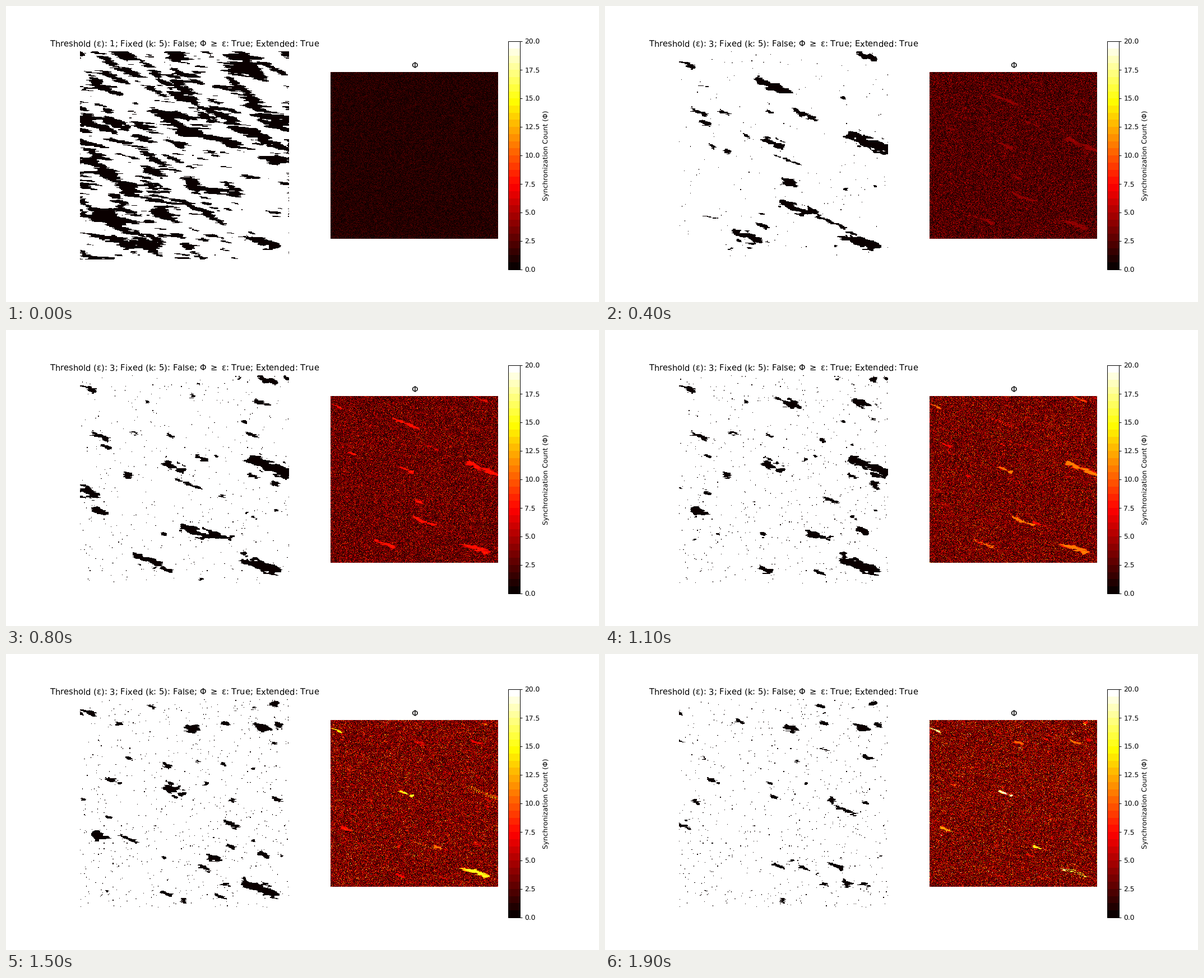
These frames come from a looping animation (1058x529 px, 2 s). A matplotlib script:

```python
import numpy as np
import matplotlib.pyplot as plt
from matplotlib.animation import FuncAnimation

FRAMES = 20
N = 300
LEFT, TOP, SIDE = 132.25, 80.8, 372.7  # state panel on the stage, in pixels
SLOPE = 0.4
rng = np.random.default_rng(12)


def smooth(sx, sy, slant):
    """Unit-variance noise, stretched along a slanted direction."""
    fx, fy = np.meshgrid(np.fft.fftfreq(N), np.fft.fftfreq(N))
    gain = np.exp(-2 * np.pi**2 * (((fx + slant * fy) * sx)**2 + (fy * sy)**2))
    field = np.fft.ifft2(np.fft.fft2(rng.normal(size=(N, N))) * gain).real
    return field / field.std()


# Largest clusters: x, y, half length, radius, first step, last step
major = [
    (470, 243, 32, 8, 0, 11), (300, 143, 27, 5, 0, 7), (198, 212, 18, 8, 0, 1),
    (357, 196, 14, 5, 0, 6), (302, 245, 13, 6, 0, 18), (329, 318, 7, 6, 0, 7),
    (340, 361, 23, 6, 0, 10), (371, 366, 6, 5, 4, 18), (405, 387, 24, 3, 1, 5),
    (452, 420, 26, 8, 0, 15), (252, 411, 20, 6, 0, 9), (147, 291, 11, 8, 7, 10),
    (166, 325, 9, 6, 7, 18), (331, 132, 6, 6, 9, 20), (456, 131, 10, 5, 8, 20),
    (479, 88, 2, 5, 11, 20), (147, 105, 9, 4, 1, 18), (355, 384, 6, 5, 12, 20),
]


def small_cluster():
    x, y = rng.uniform((LEFT, TOP), (LEFT + SIDE, TOP + SIDE))
    birth = rng.integers(1, FRAMES)
    return (x, y, rng.exponential(4), rng.uniform(2, 4.2), birth,
            birth + rng.integers(2, 9))


all_clusters = major + [small_cluster() for _ in range(95)]

unit = (np.arange(N) + 0.5) / N
X, Y = np.meshgrid(LEFT + SIDE * unit, TOP + SIDE * unit)
jitter = rng.normal(0, 1.6, (N, 1))  # ragged rows
X = X + jitter
edge_a, edge_b = smooth(3, 1.2, 0.2), smooth(3, 1.2, 0.2)
dust = rng.random((N, N))

sparse_corner = np.outer(unit**2, unit**3)
texture = smooth(9, 3, SLOPE) + 0.6 * smooth(10, 0.8, 0.1) - 4 * sparse_corner
columns = (np.arange(N) + np.rint(jitter).astype(int)) % N
texture = np.take_along_axis(texture, columns, axis=1)


def reach(t):
    """Distance to the nearest living cluster, in units of its radius."""
    turn = 0.12 * t
    edge = 1 + 0.4 * (np.cos(turn) * edge_a + np.sin(turn) * edge_b)
    nearest = np.full((N, N), 9.0)
    for x, y, half, r, birth, death in all_clusters:
        if birth <= t <= death:
            r = r * min(1, 0.7 + 0.15 * min(t - birth, death - t))
            dx, dy = X - x, Y - y
            k = np.clip((dx + SLOPE * dy) / (1 + SLOPE**2), -half, half)
            nearest = np.minimum(nearest, np.hypot(dx - k, dy - SLOPE * k) / r)
    return nearest / np.maximum(edge, 0.05)


def specks(t):
    d = 0.008 * np.clip((t - 1) / 11, 0.03, 1)
    return (dust < 0.6 * d) | (rng.random((N, N)) < 0.4 * d)


def background(t):
    mean = 1.1 + 3.1 * (1 - np.exp(-t / 7))
    return np.minimum(np.rint(rng.gamma(2, mean / 2, (N, N))), t + 2)


def simulate():
    """Cluster cores count up each step; released cells fade out at random."""
    age, steps = np.zeros((N, N)), []
    for t in range(FRAMES):
        steps.append([None, np.maximum(background(t), age)])
        near = reach(t)
        cover = 0.29 * np.exp(-1.4 * t)
        streaks = texture > np.quantile(texture, 1 - cover)
        steps[t][0] = (near < 1) | streaks | specks(t)
        fading = np.where(rng.random((N, N)) < 0.7, age, 0)
        age = np.where(near < 0.55, age + 1, fading)
    return steps


steps = simulate()


def title(t):
    eps = min(1 + t // 2, 3)
    return (f"Threshold (ε): {eps}; Fixed (k: 5): False; "
            r"Φ $\geq$ ε: True; Extended: True")


plt.rcParams["text.hinting"] = "none"
fig, (ax_state, ax_phi) = plt.subplots(1, 2, figsize=(12, 6), dpi=1058 / 12)
state_im = ax_state.imshow(~steps[0][0], cmap="hot", vmin=0, vmax=1,
                           interpolation="nearest")
phi_im = ax_phi.imshow(steps[0][1], cmap=plt.get_cmap("hot", 32), vmin=0,
                       vmax=20, interpolation="nearest")
fig.colorbar(phi_im, ax=ax_phi, label="Synchronization Count (Φ)")
heading = ax_state.set_title(title(0))
ax_phi.set_title("Φ")
for ax in (ax_state, ax_phi):
    ax.axis("off")


def update(t):
    black, phi = steps[t]
    state_im.set_data(~black)
    phi_im.set_data(phi)
    heading.set_text(title(t))
    return state_im, phi_im, heading


anim = FuncAnimation(fig, update, frames=FRAMES, interval=100,
                     init_func=lambda: update(0), repeat=True, repeat_delay=0)
plt.show()
```
